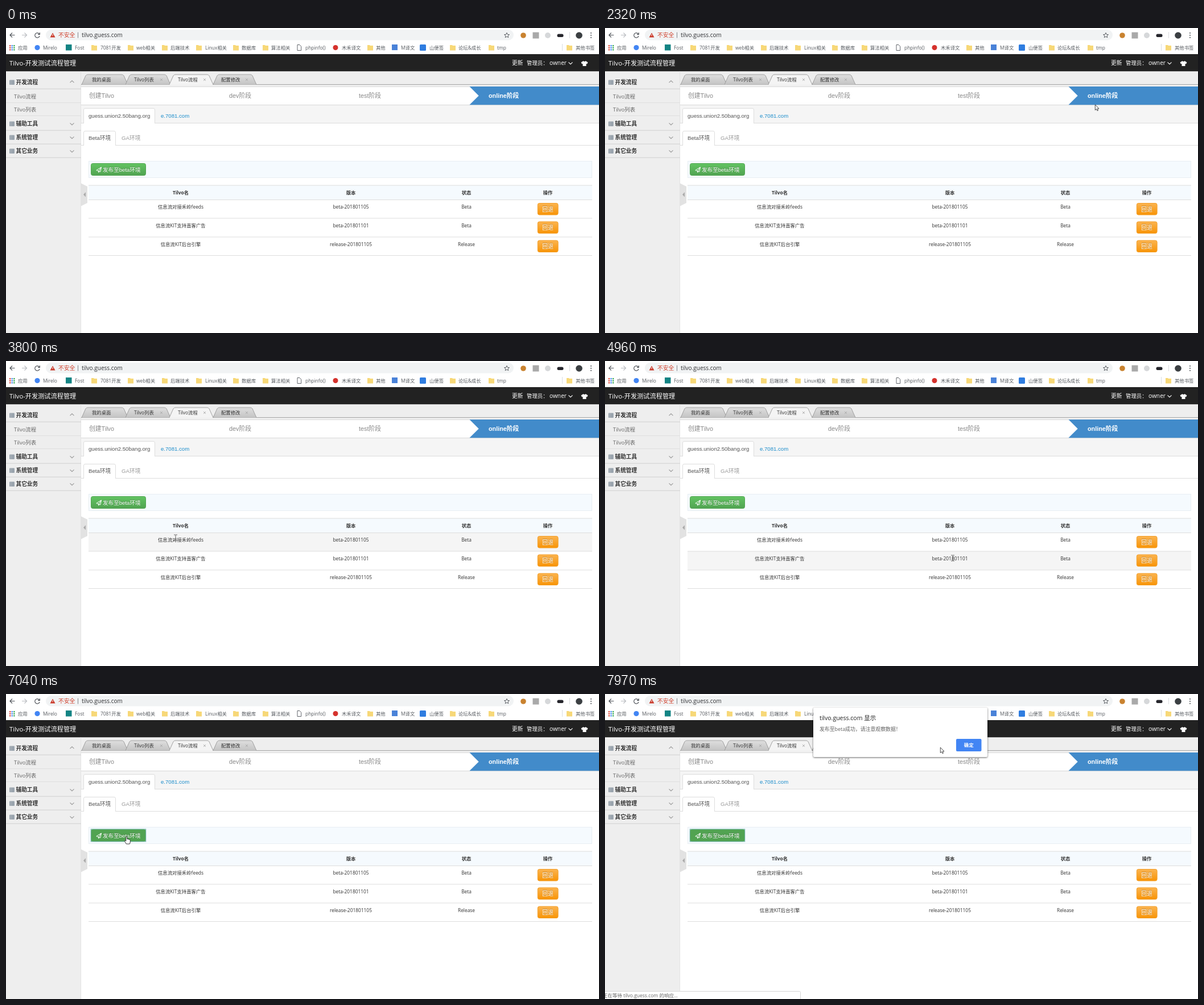
Write an HTML page that moves like this. It is 1042 px wide and 537 px high and loops after 8 s.

```html
<!DOCTYPE html>
<html lang="zh">
<head>
<meta charset="utf-8">
<title>流程管理</title>
<style>
html, body { margin: 0; width: 100%; height: 100%; overflow: hidden; background: #fff; }
svg { display: block; width: 1042px; height: 537px; }
text { font-family: "Open Sans", "Noto Sans CJK SC", sans-serif; white-space: pre; }
.a { font-family: "Liberation Sans", "Noto Sans CJK SC", sans-serif; }
.b { font-weight: bold; }
.m { text-anchor: middle; }
.s { text-shadow: 0 -1px 0 rgba(0, 0, 0, .25); }
</style>
</head>
<body>
<svg id="stage" viewBox="0 0 1042 537"></svg>
<script>
const stage = document.getElementById('stage');
const text = (x, y, s, size, fill, cls = '') =>
  `<text x="${x}" y="${y}" font-size="${size}" fill="${fill}" class="${cls}">${s}</text>`;
const rect = (x, y, w, h, fill, more = '') =>
  `<rect x="${x}" y="${y}" width="${w}" height="${h}" fill="${fill}" ${more}/>`;
const shape = (d, fill, stroke = 'none', w = 1) =>
  `<path d="${d}" fill="${fill}" stroke="${stroke}" stroke-width="${w}"/>`;
const line = (d, stroke, w = 1) => shape(d, 'none', stroke, w);
const disc = (x, y, r, fill) => `<circle cx="${x}" cy="${y}" r="${r}" fill="${fill}"/>`;
const grad = (id, top, end) => `<linearGradient id="${id}" x2="0" y2="1">
  <stop stop-color="${top}"/><stop offset="1" stop-color="${end}"/></linearGradient>`;
const chevron = (x, y, d, color) => line(`M${x - 3.5} ${y - d}l3.5 ${2 * d}l3.5 ${-2 * d}`, color, 1.1);

const rowY = [302.5, 335, 368];
const HOST = 'tilvo.guess.com';

function addressBar() {
  let out = rect(70, 3, 822, 18.5, '#f1f3f4', 'rx="9.2"');
  out += line('M15.5 12.5H7M11 8.5L7 12.5L11 16.5', '#50545a', 1.2);
  out += line('M28 12.5H36.5M32.5 8.5L36.5 12.5L32.5 16.5', '#b9bcc0', 1.2);
  out += line('M58.3 10.3A4.2 4.2 0 1 0 59 14M59.3 8V11.3H56', '#50545a', 1.2);
  out += shape('M82 8.5L86.5 16.5H77.5Z', '#c93a2b') + rect(81.5, 11, 1, 3, '#fff');
  out += text(92, 16, '不安全', 9.8, '#d0432f') + rect(126, 7.5, 1, 10, '#80868b');
  out += text(133, 16, HOST, 10, '#303134');
  out += line('M880 8.3L881.3 11.3L884.5 11.6L882 13.7L882.8 16.8L880 15.1L877.2 16.8L878 13.7L875.5 11.6L878.7 11.3Z', '#5f6368');
  out += disc(909, 13, 4.8, '#c9822f') + rect(925.5, 7.5, 11, 11, '#a9a9a9');
  out += disc(952, 13, 5, '#d6d8da') + rect(968.5, 10.5, 11, 5.5, '#26262c', 'rx="2.5"');
  out += rect(990, 7, 1, 11, '#dadce0') + disc(1007, 13, 5.8, '#3b3f42');
  return out + [8.8, 12.8, 16.8].map(y => disc(1028, y, 1.1, '#5f6368')).join('');
}

function bookmarks() {
  const colors = ['#e04b3c', '#4285f4', '#34a853'];
  let out = '';
  for (let i = 0; i < 9; i++)
    out += rect(6 + i % 3 * 3.6, 30 + (i / 3 | 0) * 3.6, 2.3, 2.3, colors[i % 3]);
  out += disc(55, 34.5, 4.6, '#4285f4') + rect(105, 29, 10.5, 10.5, '#138484');
  out += shape('M512 29.5H516L518.7 32.5V39.5H512Z', '#fff', '#60646a');
  out += disc(579, 34.5, 4.5, '#d5322d') + rect(678, 29, 10, 10, '#4a82d8') + rect(727, 29, 11, 11, '#2f7de0', 'rx="1.5"');
  const folders = [150, 214, 274, 334, 399, 451, 635, 780, 848, 985];
  out += folders.map(x => shape(`M${x} 30h4l1 1h5v8.5h-10z`, '#f7d878')).join('');
  const names = [[21, '应用'], [65, 'Mirelo'], [121, 'Fost'], [166, '7081开发'], [229, 'web相关'],
    [289, '后端技术'], [350, 'Linux相关'], [414, '数据库'], [466, '算法相关'], [526, 'phpinfo()'],
    [590, '木禾译文'], [650, '其他'], [694, 'M译文'], [744, '山便签'], [795, '论坛&amp;成长'],
    [863, 'tmp'], [1001, '其他书签']];
  out += names.map(([x, s]) => text(x, 37.7, s, 8.4, '#55595e')).join('');
  return out + rect(977, 28, 1, 12, '#dadce0');
}

function header() {
  return rect(0, 46, 1042, 30.5, '#222') + text(6, 65.5, 'Tilvo-开发测试流程管理', 11.2, '#fff') +
    text(889, 65, '更新', 9.8, '#fff') + text(915, 65, '管理员：', 9.4, '#fff') +
    text(955, 65, 'owner', 10.2, '#fff') + chevron(992, 62, 1.7, '#fff') +
    shape('M1014.5 58L1010.5 60.5L1012 63.5L1013.5 62.8V67H1019.5V62.8L1021 63.5L1022.5 60.5L1018.5 58Q1016.5 60 1014.5 58Z', '#fff');
}

function sidebar() {
  let out = rect(0, 76.5, 132, 461, '#eee') + rect(131, 76.5, 1, 461, '#e3e3e3');
  [['开发流程', 95], ['辅助工具', 168], ['系统管理', 192], ['其它业务', 216]].forEach(([s, y], i) => {
    out += rect(6, y - 3.5, 9, 8.5, '#9ba5ae', 'rx="1"') + line(`M8.5 ${y - 3}v8`, '#b9c1c8', .7) +
      text(17.5, y + 3.7, s, 9.7, '#333', 'b') + chevron(116, y + (i ? 1 : -.5), i ? 1.7 : -1.7, '#999') +
      rect(0, y + 11.7, 132, 1, '#cfcfcf');
  });
  [['Tilvo流程', 120], ['Tilvo列表', 143]].forEach(([s, y]) => {
    out += text(14, y + 3.7, s, 9.4, '#666') + rect(0, y + 11, 132, 1, '#dfdfdf');
  });
  return out + shape('M132 273.5L143 279V308L132 313.5Z', '#e2e2e2') + shape('M140 289V297.5L136 293.2Z', '#aaa');
}

function pageTabs() {
  let out = rect(132, 76.5, 910, 24, '#eee') + rect(132, 99, 910, 1, '#a5a5a5') + rect(132, 100, 910, 3, '#efefef');
  const tabs = [[133, 214, 151, '我的桌面'], [210, 289, 225, 'Tilvo列表', 273],
    [364, 440, 378, '配置修改', 423], [287, 364, 302, 'Tilvo流程', 349]];
  tabs.forEach(([l, r, x, s, close], i) => {
    const on = i === 3;
    out += shape(`M${l} 99.5L${l + 7} 84Q${l + 8} 82 ${l + 11} 82H${r - 11}Q${r - 8} 82 ${r - 7} 84L${r} 99.5`,
      on ? '#f4f4f4' : 'url(#tab)', '#999', .9);
    if (on) out += rect(l + 1, 99, r - l - 2, 1.5, '#f2f2f2');
    out += text(x, 94, s, 8.4, '#333');
    if (close) out += line(`M${close - 2} 89l4 4m0 -4l-4 4`, '#aaa', .9);
  });
  return out;
}

function stages() {
  let out = rect(132, 103, 910, 33, '#fff') + rect(132, 103, 910, 1, '#ddd') + rect(132, 135, 910, 1, '#d8d8d8');
  out += shape('M814.5 103H1042V135.3H814.5L830.7 119.2Z', '#428bca');
  [[146, '创建Tilvo'], [392, 'dev阶段'], [620, 'test阶段']].forEach(([x, s]) => {
    out += text(x, 123.3, s, 10.8, '#888', 'a');
  });
  out += text(848, 123.3, 'online阶段', 10.8, '#fff', 'a b');
  out += rect(132, 136, 910, 31, '#f5f5f5') + rect(132, 167, 910, 1, '#ddd');
  out += shape('M136.5 168V144Q136.5 141.5 139 141.5H259Q261.5 141.5 261.5 144V168', '#fff', '#ddd');
  out += text(145, 157.7, 'guess.union2.50bang.org', 9.6, '#555', 'a') + text(272, 157.7, 'e.7081.com', 9.6, '#1b8dcb', 'a');
  out += rect(132, 206, 910, 1, '#ddd');
  out += shape('M136.5 207V184Q136.5 181.5 139 181.5H190Q192.5 181.5 192.5 184V207', '#fff', '#ddd');
  return out + text(145, 197, 'Beta环境', 9.7, '#555', 'a') + text(203, 197, 'GA环境', 9.7, '#999', 'a');
}

function table() {
  const cols = [307, 606, 809, 952];
  let out = rect(145.5, 234.5, 884, 29, '#f5fafe', 'stroke="#e8eef3"');
  out += rect(149.5, 238.5, 96, 21, 'url(#green)', 'id="publish" rx="3" stroke="#52a552"');
  out += `<rect id="focus" x="149.3" y="238" width="96.4" height="21.8" fill="none" stroke="#69ada0"/>`;
  out += line('M158.8 250.5L167.5 245L165.8 253.2L162.8 251.8ZM162.8 251.8L167.5 245M162.6 252V254.3L164.2 252.5', '#fff', 1);
  out += text(170, 252.6, '发布至beta环境', 9.6, '#fff', 'a s');
  out += rect(145, 277, 885, 25.5, '#f5fafe') + rect(145, 276.5, 885, 1, '#ddd');
  ['Tilvo名', '版本', '状态', '操作'].forEach((s, i) => out += text(cols[i], 293, s, 8.3, '#333', 'b m'));
  const rows = [['信息流对接禾岭feeds', 'beta-201801105', 'Beta'],
    ['信息流KIT支持直客广告', 'beta-201801101', 'Beta'], ['信息流KIT后台引擎', 'release-201801105', 'Release']];
  rows.forEach((cells, r) => {
    const y = rowY[r];
    out += rect(145, y, 885, 32.5, '#f5f5f5', `id="row${r}"`) + rect(145, y - .5, 885, 1, '#ddd');
    cells.forEach((s, i) => out += text(cols[i], y + 15.5, s, 8.4, '#333', 'm'));
    out += rect(934.3, y + 6, 35.8, 20.5, 'url(#orange)', `id="back${r}" rx="3" stroke="#f3a02c"`) +
      text(952, y + 20, '回退', 9.8, '#fff', 'a m s');
  });
  return out + rect(145, 400, 885, 1, '#ddd');
}

function popups() {
  return `<g id="status">${rect(-1, 523.5, 344.5, 15, '#fff', 'rx="2" stroke="#d5d5d5"')}
    ${text(-4, 534, `正在等待 ${HOST} 的响应...`, 8.5, '#666')}</g>
  <g id="dialog">${rect(366, 24, 306, 87, '#fff', 'rx="2" style="filter:drop-shadow(0 1px 1.5px rgba(0,0,0,.6))"')}
    ${text(377, 46, `${HOST} 显示`, 10.5, '#222')}${text(377, 64.5, '发布至beta成功，请注意观察数据！', 8.9, '#606060')}
    ${rect(617, 79, 44.5, 22, '#4285f4', 'rx="2"')}${text(639.2, 93.2, '确定', 8.5, '#fff', 'b m')}</g>`;
}

// Every pointer has its hot spot at 0,0.
const pointers = `
  <g id="arrow">${shape('M.3 0V9.6L2.5 7.6L4 10.8L5.5 10.1L4.1 7H7Z', '#fff', '#222', .8)}</g>
  <g id="hand">${shape('M-1.2 8V1Q-1.2 0 -.2 0Q.9 0 .9 1V4.3Q2.2 3.6 2.9 4.8Q4.3 4.3 4.7 5.4Q6.3 5 6.3 6.6V9Q6.3 11 5.2 13H-.6Q-1.4 11 -3.6 8.4Q-4 7 -2.7 7Z', '#fff', '#222', .9)}</g>
  <g id="beam">${line('M-3 -5H-.6L0 -4.5L.6 -5H3M0 -4.5V4.5M-3 5H-.6L0 4.5L.6 5H3', '#555', .9)}</g>`;

stage.innerHTML = `<defs>${grad('green', '#62c462', '#51a351')}${grad('orange', '#fbb450', '#f89406')}
  ${grad('tab', '#dedede', '#c4c4c4')}</defs>` + rect(0, 0, 1042, 537, '#fff') + addressBar() + bookmarks() +
  header() + sidebar() + pageTabs() + stages() + table() + popups() + pointers;

// Pointer moves: first step, last step, number of steps, end x, end y.
const moves = [
  [300, 300, 1, 897, 530], [380, 620, 4, 520, 340], [700, 860, 3, 300, 236], [930, 1010, 2, 228, 251],
  [1300, 1380, 2, 230, 251], [1530, 2090, 8, 800, 114], [2170, 2320, 3, 861, 135], [2400, 2480, 2, 868, 129],
  [2630, 3180, 8, 300, 280], [3260, 3410, 3, 206, 252], [3500, 3570, 2, 209, 250],
  [3730, 3800, 2, 298, 311], [3880, 4180, 5, 955, 322], [4260, 4490, 4, 588, 343],
  [4960, 5500, 8, 770, 377], [5650, 5800, 3, 620, 394], [5880, 5960, 2, 369, 323], [6030, 6420, 6, 213, 263],
  [6500, 6740, 4, 212, 251], [7670, 7970, 5, 589, 94]
];

function pointerAt(t) {
  let x = 897, y = 560;
  for (const [from, to, n, ex, ey] of moves) {
    if (t < from) break;
    const step = (to - from) / (n - 1) || 1;
    const p = Math.min(n, Math.floor((t - from) / step + 1e-6) + 1) / n;
    x += (ex - x) * p;
    y += (ey - y) * p;
  }
  return [x, y];
}

const el = id => document.getElementById(id);
const show = (id, on) => el(id).setAttribute('visibility', on ? 'visible' : 'hidden');
const inside = (x, y, l, t, r, b) => x >= l && x <= r && y >= t && y <= b;

function draw() {
  const t = performance.now() % 8000;
  const [x, y] = pointerAt(t);
  const focus = t >= 6890;
  const onPublish = inside(x, y, 149, 238, 246, 260);
  let kind = onPublish ? 'hand' : 'arrow';
  el('publish').setAttribute('fill', onPublish || focus ? '#51a351' : 'url(#green)');
  show('focus', focus);

  rowY.forEach((top, r) => {
    const onBack = inside(x, y, 934, top + 6, 971, top + 27);
    const onText = [[262, 352], [569, 643], [795, 824]].some(([l, e]) => inside(x, y, l, top + 5, e, top + 20));
    show('row' + r, inside(x, y, 145, top, 1030, top + 32.4));
    el('back' + r).setAttribute('fill', onBack ? '#f89406' : 'url(#orange)');
    if (onBack) kind = 'hand';
    else if (onText) kind = 'beam';
  });

  for (const id of ['arrow', 'hand', 'beam']) {
    show(id, id === kind && t >= 300);
    el(id).setAttribute('transform', `translate(${Math.round(x)} ${Math.round(y)})`);
  }

  const stepIn = Math.max(0, Math.min(3, Math.floor((t - 7270) / 76.5)));
  show('status', t >= 7270);
  el('dialog').setAttribute('opacity', stepIn / 3);
  el('dialog').setAttribute('transform', `translate(0 ${(stepIn - 3) * 2.5})`);
  requestAnimationFrame(draw);
}
draw();
</script>
</body>
</html>
```
